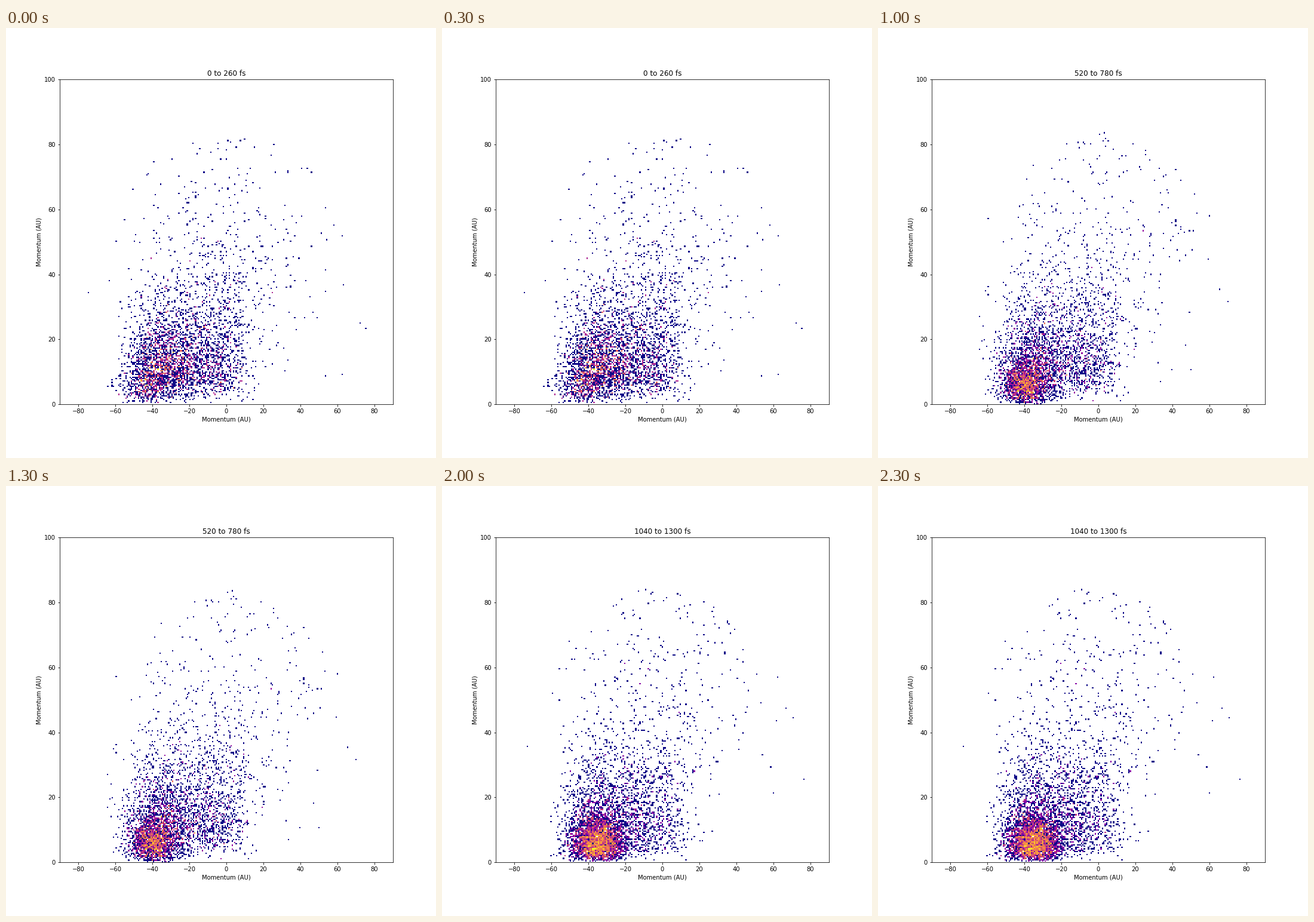
Animation, 720 px wide and 720 px high, one loop 2500 ms. Source, as a matplotlib script:

```python
import numpy as np
import matplotlib.pyplot as plt
from matplotlib.animation import FuncAnimation
from matplotlib.colors import LogNorm

WINDOWS = 5
STEP = 260  # fs covered by each window
BINS = 200  # cells across the spread of the data


def cold_cluster(rng, i):
    """Slow particles that gather and drift to the right."""
    n = 250 + 570 * i
    x = rng.normal(-45.5 + 2.75 * i, 5.6 + 0.4 * i, n)
    return x, rng.rayleigh(5, n)


def skirt(rng, n=850):
    return rng.normal(-37, 8.5, n), rng.gamma(3, 4, n)


def band(rng, i):
    """Wide mound that thins out slowly."""
    n = 2200 - 130 * i
    x = rng.uniform(-44, 5, n) + rng.normal(0, 7, n)
    return x, rng.gamma(2.9, 5.9, n)


def halo(rng, n=400):
    """Fast particles in a half disc around the origin."""
    r = 25 + 60 * rng.beta(1, 1.2, n)
    c = rng.normal(0.02, 0.5, n)
    r, c = r[abs(c) < 0.99], c[abs(c) < 0.99]
    return r * c, r * np.sqrt(1 - c ** 2)


def momenta(i):
    rng = np.random.RandomState(40 + i)
    return np.hstack([cold_cluster(rng, i), skirt(rng),
                      band(rng, i), halo(rng)])


fig = plt.figure(figsize=(10, 10), dpi=72)
ax = fig.add_axes([0.125, 0.125, 0.775, 0.755])
meshes = [ax.hist2d(*momenta(i), bins=BINS, cmin=1, cmap="plasma",
                    norm=LogNorm())[3] for i in range(WINDOWS)]
ax.set(xlim=(-90, 90), ylim=(0, 100),
       xlabel="Momentum (AU)", ylabel="Momentum (AU)")
title = ax.set_title("")


def update(i):
    for k, mesh in enumerate(meshes):
        mesh.set_visible(k == i)
    title.set_text(f"{STEP * i} to {STEP * (i + 1)} fs")
    return *meshes, title


anim = FuncAnimation(fig, update, frames=WINDOWS, interval=500,
                     repeat=True, repeat_delay=0)
plt.show()
```
